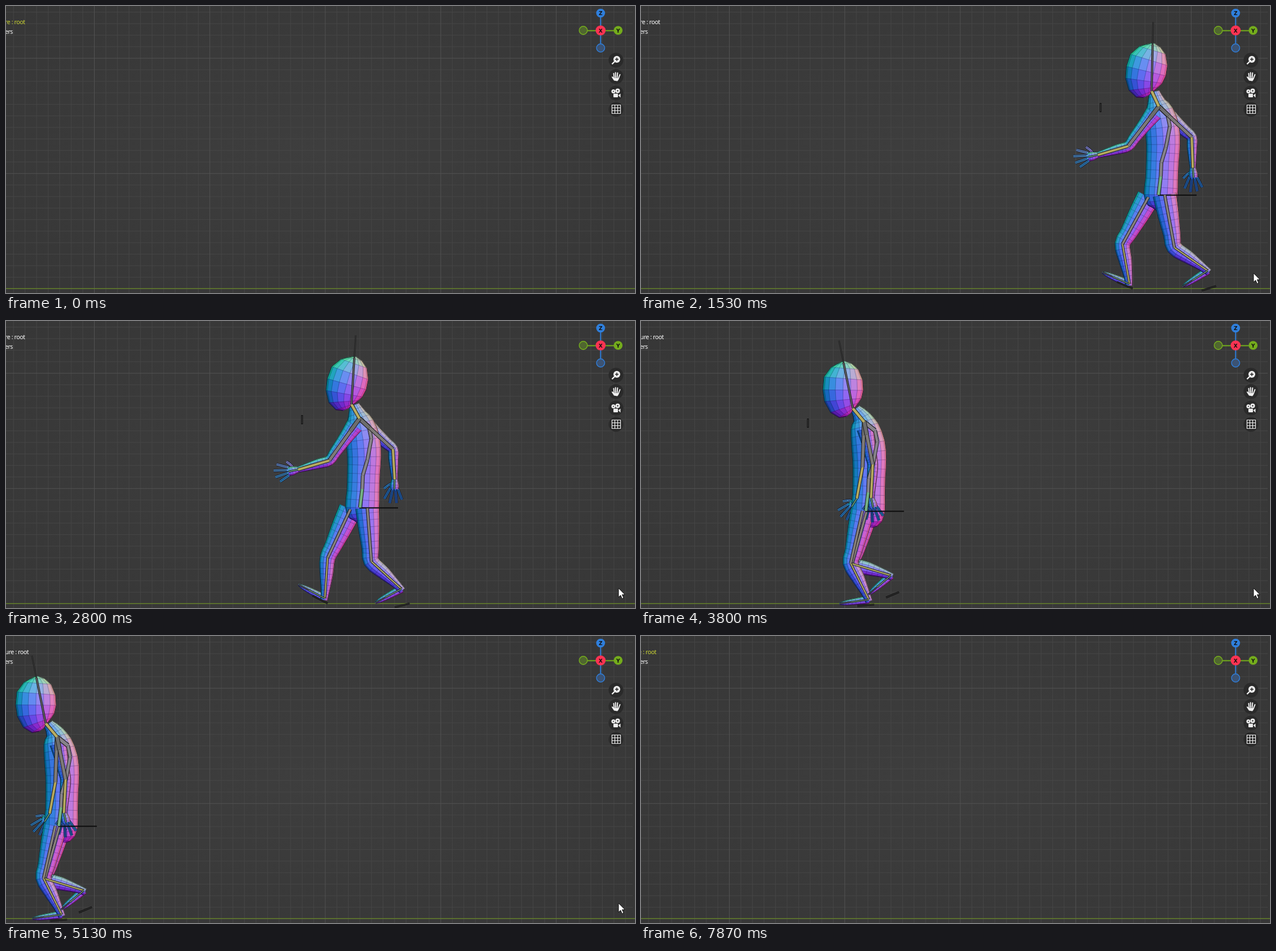
Recreate the animation shown at these times as an HTML page with a canvas. Size 1107 px wide and 506 px high, loop 7.94 s.

```html
<!DOCTYPE html>
<html lang="en">
<head>
<meta charset="utf-8">
<title>Walk cycle</title>
<style>
  html, body { margin: 0; width: 1107px; height: 506px; overflow: hidden; background: #393939; }
  svg, canvas { position: absolute; left: 0; top: 0; display: block; }
  .label { font: 10.5px "Noto Sans", "Open Sans", sans-serif; letter-spacing: -.4px; text-anchor: end; }
  .axis { font: bold 9px "DejaVu Sans", sans-serif; text-anchor: middle; }
</style>
</head>
<body>
<svg width="1107" height="506">
  <defs>
    <radialGradient id="bg" cx=".5" cy=".5" r=".72">
      <stop offset="0" stop-color="#3e3e3e"/><stop offset="1" stop-color="#363636"/>
    </radialGradient>
  </defs>
  <rect width="1107" height="506" fill="url(#bg)"/>
  <path id="minor" stroke="#464646"/>
  <path id="major" stroke="#525252"/>
  <rect x="1103" width="4" height="506" fill="#373737"/>
  <path d="M0 498.3H1107" stroke="#64802a" stroke-width="1.5"/>
</svg>
<canvas id="stage" width="1107" height="506"></canvas>
<svg width="1107" height="506">
  <text id="bone" class="label" y="32"></text>
  <text class="label" x="12" y="49" fill="#fff">Centimeters</text>
  <g stroke-width="2">
    <path d="M1046.5 12V66" stroke="#2f7fdc"/>
    <path d="M1023 43.500H1077" stroke="#74ac1c"/>
  </g>
  <g stroke-width="1.4">
    <circle cx="1016" cy="43" r="7.2" fill="#50662f" stroke="#76b01d"/>
    <circle cx="1046.500" cy="74" r="7.200" fill="#3c5373" stroke="#2f7fdc"/>
  </g>
  <circle cx="1046.500" cy="12.500" r="7.800" fill="#2f7fdc"/>
  <circle cx="1077.300" cy="43" r="7.800" fill="#74ac1c"/>
  <circle cx="1046.500" cy="43" r="8.800" fill="#ff3352"/>
  <g class="axis" fill="#111">
    <text x="1046.500" y="15.800">Z</text><text x="1077.300" y="46.500">Y</text><text x="1046.500" y="46.500">X</text>
  </g>
  <g fill="#2a2a2a">
    <circle cx="1073.500" cy="95.500" r="13"/><circle cx="1073.500" cy="124.500" r="13"/>
    <circle cx="1073.500" cy="153.500" r="13"/><circle cx="1073.500" cy="182.300" r="13"/>
  </g>
  <g fill="#eee" stroke="none">
    <circle cx="1075" cy="94" r="6"/>
    <path d="M1071 98L1066.500 102.500" stroke="#eee" stroke-width="2.400"/>
    <path d="M1072 94H1078M1075 91V97" stroke="#222" stroke-width="1.400"/>
    <path d="M1070 131.500L1066 125.500Q1066 123.500 1068.500 125L1070 127L1079 127L1080 124L1078 130L1076 132.500Z"/>
    <path d="M1070.500 127L1069.500 119M1073 126L1072.700 117.500M1075.700 126L1076.300 118M1078 127.500L1080.500 121" fill="none" stroke="#eee" stroke-width="2" stroke-linecap="round"/>
    <circle cx="1069" cy="150.500" r="3.500"/><circle cx="1076.500" cy="149.500" r="4"/>
    <rect x="1069" y="154.500" width="8" height="6.500" rx="1"/>
    <path d="M1077.500 157.500L1081.500 154.500V161.500Z"/>
    <circle cx="1069" cy="150.500" r="1" fill="#2a2a2a"/><circle cx="1076.500" cy="149.500" r="1.200" fill="#2a2a2a"/>
  </g>
  <path d="M1066.500 174.500H1081.500V189.500H1066.500ZM1071.500 174.500V189.500M1076.500 174.500V189.500M1066.500 179.500H1081.500M1066.500 184.500H1081.500" fill="none" stroke="#eee" stroke-width="1.200"/>
  <path id="cursor" d="M0 0V16L3.700 12.600L6.300 18.500L9 17.300L6.400 11.600H11.300Z" fill="#fff" stroke="#111" stroke-width="1"/>
</svg>
<script>
const $ = id => document.getElementById(id);
const ctx = $('stage').getContext('2d');
const LOOP = 7940, TICK = 1000 / 15, CYCLE = 4000 / 3, RAD = Math.PI / 180;

function drawGrid() {
  const paths = ['', ''];
  for (let i = -7; i < 47; i++) paths[i % 10 ? 0 : 1] += `M${155.5 + i * 20.32} 0V506`;
  for (let i = -20; i < 4; i++) paths[i % 10 ? 0 : 1] += `M0 ${295.3 + i * 20.32}H1103`;
  for (let i = 4; i < 11; i++) paths[i % 10 ? 0 : 1] += `M0 ${295.3 + i * 20.32}H1103`;
  $('minor').setAttribute('d', paths[0]);
  $('major').setAttribute('d', paths[1]);
}

// phase, hip x, hip y, thigh, shin and foot angles, drop of the foot control
const LEG = [
  [0, -16, 332, -25, -4, -117.5, 2], [.047, -17, 337, -29, 9.7, -113.7, 2],
  [.25, -5, 335, -12.7, 26.6, -82, 10], [.35, 5, 335, -2, 27.6, -79, 12],
  [.5, 14, 330, 4.3, 47.7, -62, 29], [.547, 12, 333, 10.7, 55, -58, 31],
  [.75, 2, 337, -15.6, 73.2, -50, 34], [.85, -7, 330, -40.3, 6.3, -103, 8]
];
// phase, elbow, wrist, hand angle
const ARM = [
  [0, -53, 246, -108, 262, -78], [.047, -53, 247, -107, 262, -78],
  [.25, -5, 258, -15, 313, -32], [.35, 30, 240, 32, 295, -16],
  [.5, 59, 226, 62, 279, -2], [.547, 60, 231, 62, 285, 4],
  [.75, 13, 253, 10, 312, 13], [.85, -23, 252, -48, 303, -15]
];
// phase, pelvis y, neck base, neck top, head tilt
const BODY = [
  [0, 329, 0, 172, -14, 147, 3.5], [.047, 333, 1.5, 177, -11, 150, 1.4],
  [.25, 335, -2, 178, -22, 154, -11.5], [.35, 327, -4, 167, -21, 146, -2]
];
// centre and half width, measured from the neck top
const HEAD = [
  [2, -84, 3], [1, -80, 13], [0, -72, 24], [-6, -55, 34], [-10.5, -35, 35.5],
  [-14, -18, 32.5], [-14, -4, 26], [-11, 5, 17], [-9, 9, 6]
];
// centre, share of the way from neck to pelvis, half width
const TRUNK = [
  [.5, .05, 24.5], [6.5, .24, 29.5], [8.5, .43, 29.5], [7.5, .62, 28.5],
  [6.5, .82, 28.5], [5, 1, 29.5], [6, 1.12, 23], [5, 1.18, 8]
];

function cyclic(rows, phase, period = 1) {
  const p = phase - Math.floor(phase / period) * period, n = rows.length;
  let i = n - 1;
  while (rows[i][0] > p) i--;
  const row = k => rows[(k + n) % n];
  const time = k => row(k)[0] + Math.floor(k / n) * period;
  const [a, b, c, d] = [i - 1, i, i + 1, i + 2];
  const h = time(c) - time(b), u = (p - time(b)) / h;
  return row(b).map((v, j) => {
    const w = row(c)[j];
    const m = (w - row(a)[j]) / (time(c) - time(a)) * h;
    const q = (row(d)[j] - v) / (time(d) - time(b)) * h;
    return v + u * (m + u * (3 * (w - v) - 2 * m - q + u * (2 * (v - w) + m + q)));
  }).slice(1);
}

function along(pts, u) {
  const last = pts.length - 1, i = Math.min(Math.floor(u), last - 1), f = u - i;
  const [a, b, c, d] = [-1, 0, 1, 2].map(k => pts[Math.max(0, Math.min(last, i + k))]);
  return b.map((v, j) => v + f / 2 * (c[j] - a[j] + f * (2 * a[j] - 5 * v + 4 * c[j] - d[j]
    + f * (3 * (v - c[j]) + d[j] - a[j]))));
}

const polar = ([x, y], deg, len) => [x + Math.sin(deg * RAD) * len, y + Math.cos(deg * RAD) * len];
const mix = (a, b, f) => [a[0] + (b[0] - a[0]) * f, a[1] + (b[1] - a[1]) * f];

function line(pts, color, width) {
  ctx.beginPath();
  pts.forEach(p => ctx.lineTo(p[0], p[1]));
  ctx.strokeStyle = color;
  ctx.lineWidth = width;
  ctx.stroke();
}

function normalColor(x, y, z) {
  const len = Math.hypot(x, y, z);
  const c = [x, -y * .9, z].map(v => Math.round(122 + 122 * v / len));
  return `rgb(${c})`;
}

// Wireframed tube through [x, y, radius], shaded by its surface normal
function tube(pts, per = 3, n = 6) {
  const last = pts.length - 1, rows = [];
  for (let s = 0; s <= last * per; s++) {
    const u = s / per, [x, y, r] = along(pts, u);
    const a = along(pts, Math.max(0, u - .05)), b = along(pts, Math.min(last, u + .05));
    const len = Math.hypot(b[0] - a[0], b[1] - a[1]) || 1;
    const t = [(b[0] - a[0]) / len, (b[1] - a[1]) / len];
    const slope = Math.max(-2, Math.min(2, (a[2] - b[2]) / len));
    const cells = [];
    for (let j = 0; j <= n; j++) {
      const w = r * Math.sin((j / n - .5) * Math.PI);
      cells.push([x - t[1] * w, y + t[0] * w]);
    }
    rows.push({ t, slope, cells });
  }
  for (let s = 0; s < rows.length - 1; s++) {
    const { t, slope, cells } = rows[s], next = rows[s + 1];
    const k = (slope + next.slope) / 2;
    for (let j = 0; j < n; j++) {
      const ang = ((j + .5) / n - .5) * Math.PI, w = Math.sin(ang);
      ctx.fillStyle = normalColor(-t[1] * w + t[0] * k, t[0] * w + t[1] * k, Math.cos(ang));
      ctx.beginPath();
      [cells[j], cells[j + 1], next.cells[j + 1], next.cells[j]].forEach(p => ctx.lineTo(p[0], p[1]));
      ctx.closePath();
      ctx.fill();
      ctx.strokeStyle = ctx.fillStyle;
      ctx.lineWidth = .7;
      ctx.stroke();
    }
  }
  const wire = 'rgba(12,12,50,.33)';
  rows.forEach(r => line(r.cells, wire, .7));
  for (let j = 0; j <= n; j++)
    line(rows.map(r => r.cells[j]), j % n ? wire : 'rgba(10,14,40,.75)', j % n ? .7 : 1);
}

function stick(a, b, color, width) {
  line([a, b], '#1b1b1b', width + 2);
  line([a, b], color, width);
}

function legPose(phase, x) {
  const [hx, hy, thigh, shin, foot, drop] = cyclic(LEG, phase);
  const hip = [x + hx, hy], knee = polar(hip, thigh, 94.5), ankle = polar(knee, shin, 71.5);
  return { hip, knee, ankle, toe: polar(ankle, foot, 52), foot, drop };
}

function legMesh({ hip, knee, ankle, toe, foot }) {
  tube([[...ankle, 6.5], [...mix(ankle, toe, .45), 5.5], [...mix(ankle, toe, .8), 4], [...toe, 1.5]], 3, 4);
  const heel = polar(ankle, foot + 90, 3);
  tube([[...hip, 20.5], [...mix(hip, knee, .35), 18.5], [...mix(hip, knee, .75), 15], [...knee, 13.5],
    [...mix(knee, ankle, .4), 11.5], [...mix(knee, ankle, .8), 7.5], [...heel, 6]]);
}

function legBones({ hip, knee, ankle, toe, foot, drop }) {
  stick(hip, knee, '#88817d', 3.6);
  stick(knee, ankle, '#aaa363', 2.4);
  stick(ankle, mix(ankle, toe, .62), '#74a07c', 1.4);
  stick(mix(ankle, toe, .62), toe, '#667', 1);
  const dx = Math.sin(foot * RAD), dy = Math.cos(foot * RAD) * (foot > -90 ? .5 : 1);
  const mid = [ankle[0] - 9 + drop * .35, ankle[1] + drop];
  const ends = [-15, 15].map(s => [mid[0] + dx * s, mid[1] + dy * s]);
  line(ends, '#0c0c0c', 3);
  line(ends, '#555', .7);
}

function armPose(phase, x) {
  const [ex, ey, wx, wy, hand] = cyclic(ARM, phase);
  return { elbow: [x + ex, ey], wrist: [x + wx, wy], hand };
}

function armMesh({ elbow, wrist, hand }, neck) {
  const palm = polar(wrist, hand, 17);
  const digit = (base, angle, len) => {
    const tip = polar(base, angle, len);
    const dx = Math.sin(angle * RAD), dy = Math.cos(angle * RAD);
    line([base, tip], '#10142c', 5);
    line([base, tip], normalColor(-dy * .6 - .2, -Math.abs(dx) * .6 + .3, .7), 3.4);
    line([mix(base, tip, .1), tip], '#14141c', 1);
  };
  const start = polar(wrist, hand, 5);
  digit(start, hand - 62, 13);
  digit(polar(start, hand - 62, 13), hand - 48, 9);
  [-24, -9, 6, 20].forEach((a, i) =>
    digit(polar(wrist, hand + a, 17), hand + a * 1.15, [22, 26, 25, 21][i]));
  tube([[...wrist, 5], [...mix(wrist, palm, .6), 7.5], [...palm, 7]], 2, 4);
  tube([[...mix(neck, elbow, .17), 15], [...mix(neck, elbow, .45), 12], [...mix(neck, elbow, .8), 10],
    [...elbow, 9], [...mix(elbow, wrist, .35), 8.5], [...wrist, 5]]);
}

function armBones({ elbow, wrist, hand }, neck) {
  stick(neck, mix(neck, elbow, .3), '#6d6d6d', 6);
  stick(mix(neck, elbow, .3), elbow, '#7e7a78', 5);
  stick(elbow, wrist, '#b5a95e', 4);
  stick(wrist, polar(wrist, hand, 17), '#6cae86', 1.5);
}

function drawFigure(t) {
  const x = 622 - .2272 * (t - 2800), phase = (t - 2800) / CYCLE;
  const [py, nx, ny, hx, hy, tilt] = cyclic(BODY, phase, .5);
  const neck = [x + nx, ny], top = [x + hx, hy];
  const cos = Math.cos(tilt * RAD), sin = Math.sin(tilt * RAD);
  const skull = (a, b) => [top[0] + a * cos - b * sin, top[1] + a * sin + b * cos];
  const farLeg = legPose(phase, x), nearLeg = legPose(phase + .5, x);
  const farArm = armPose(phase + .5, x), nearArm = armPose(phase, x);

  armMesh(farArm, neck);
  legMesh(farLeg);
  tube([[top[0] + 5, top[1] + 1, 9], [neck[0] - 4, neck[1] - 8, 16],
    ...TRUNK.map(([a, f, r]) => [x + a + nx * (1 - f), ny + (py - ny) * f, r])], 2, 8);
  tube(HEAD.map(([a, b, r]) => [...skull(a, b), r]), 1, 8);
  legMesh(nearLeg);
  armMesh(nearArm, neck);

  line([[x, py + .5], [x + 68, py + .5]], '#0b0b0b', 2);
  line([[x - 101, ny - 6], [x - 101, ny + 10]], '#0b0b0b', 3);
  line([[x - 101, ny - 5], [x - 101, ny + 9]], '#555', .8);
  legBones(farLeg);
  legBones(nearLeg);
  const spine = [[x + 1, py], [x + 5, py - 33], [x + 6, py - 57], [x + 14, py - 84],
    [x + 21, ny + 35], [x + 17, ny + 15], neck];
  for (let i = 0; i < 6; i++)
    stick(spine[i], spine[i + 1], i ? '#87838a' : '#73b183', i === 5 ? 6 : 4.6);
  armBones(farArm, neck);
  armBones(nearArm, neck);
  stick(neck, top, '#b9ad62', 4.6);
  stick(top, skull(0, -82), '#68686e', 1.8);
  stick(skull(0, -82), skull(0, -122), '#606060', .5);
}

function cursorAt(t) {
  if (t < 210 || t >= 6995) return null;
  if (t < 6660) return [1078, 471];
  if (t < 6730) return [1058, 468];
  if (t < 6860) return [1027, 466];
  return t < 6930 ? [930, 468] : [766, 483];
}

function render(ms) {
  const t = Math.floor((ms % LOOP + 4) / TICK) * TICK;
  ctx.clearRect(0, 0, 1107, 506);
  if (t > 60 && t < 5860) drawFigure(t);

  const wrapped = t > 7860;
  const frame = wrapped ? 8 : 10 + Math.round(t * .03);
  const label = $('bone');
  label.textContent = `(${frame}) Armature : root`;
  label.setAttribute('x', frame < 10 ? 27 : frame < 100 ? 33.5 : 40);
  label.setAttribute('fill', wrapped || t < 130 ? '#c9d332' : '#fff');

  const pos = cursorAt(t), cursor = $('cursor');
  cursor.setAttribute('visibility', pos ? 'visible' : 'hidden');
  if (pos) cursor.setAttribute('transform', `translate(${pos})`);
}

drawGrid();
ctx.lineCap = 'butt';
ctx.lineJoin = 'round';
const begin = performance.now();
function loop() {
  render(performance.now() - begin);
  requestAnimationFrame(loop);
}
loop();
</script>
</body>
</html>
```
